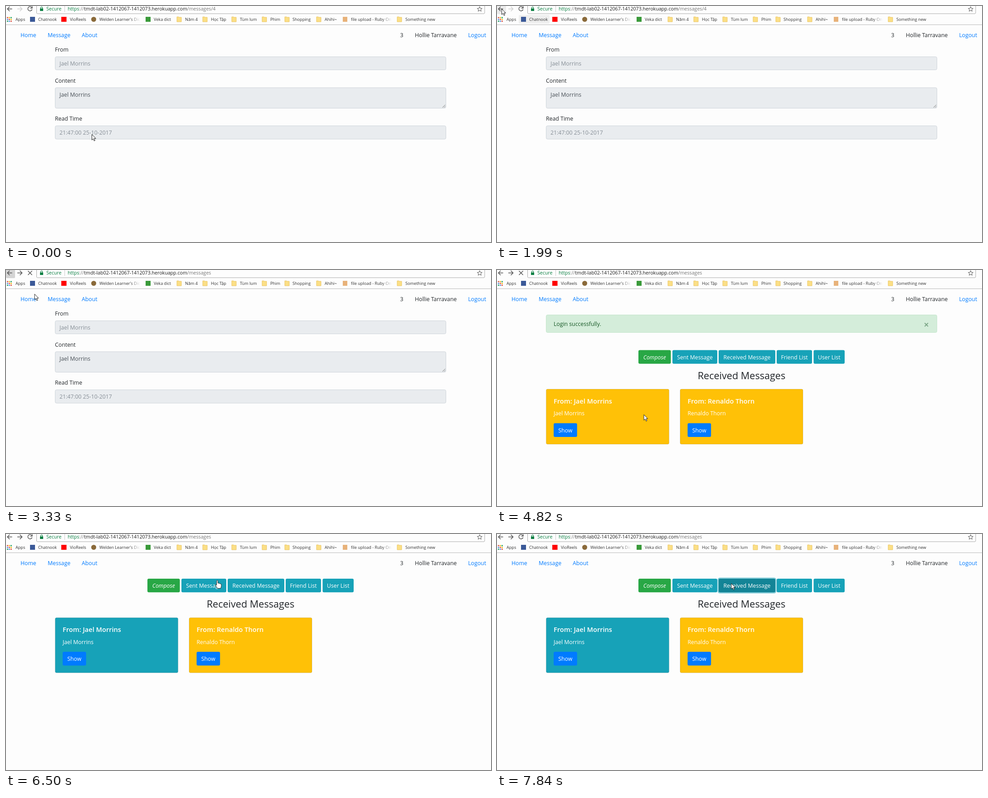
Recreate the animation shown at these times as an HTML page. Size 1070 by 523 pixels, loop 8000 ms.

```html
<!DOCTYPE html>
<html lang="en">
<head>
<meta charset="utf-8">
<title>Messages</title>
<style>
html, body { margin: 0; width: 100%; height: 100%; overflow: hidden; background: #fdfdfd; }
svg { display: block; width: 1070px; height: 523px; font: 12.25px "Open Sans", "Noto Sans", sans-serif; fill: #212529; }
text { white-space: pre; }
.mark { font-size: 9.15px; fill: #333; }
.url { font-size: 10.64px; fill: #777; }
.link { fill: #007bff; }
.white { fill: #fff; }
.mid { text-anchor: middle; }
.h5 { font-size: 14.6px; font-weight: 600; }
.h3 { font-size: 21.6px; }
.field { fill: #e9ecef; stroke: #ced4da; }
.icon { fill: none; stroke: #555; stroke-width: 1.5; }
</style>
</head>
<body>
<svg id="stage" viewBox="0 0 1070 523"></svg>
<script>
const sender = "Jael Morrins", other = "Renaldo Thorn", user = "Hollie Tarravane";
const teal = "#17a2b8", yellow = "#ffc107";

const text = (x, y, s, cls = "") => `<text x="${x}" y="${y}" class="${cls}">${s}</text>`;
const rect = (x, y, w, h, fill, r = 0, more = "") =>
  `<rect x="${x}" y="${y}" width="${w}" height="${h}" rx="${r}" fill="${fill}" ${more}/>`;
const path = (d, more = 'class="icon"') => `<path d="${d}" ${more}/>`;
const group = (id, body) => `<g id="${id}">${body}</g>`;
const field = (y, h) => rect(108.5, y, 862, h, "", 3, 'class="field"');

const folder = x => path(`M${x} 24h4l1 1h5v10h-10z`, 'fill="#fbdf86" stroke="#e6bd55" stroke-width=".8"');
const bookmark = (x, s) => text(x, 33, s, "mark");
const fade = x => rect(x, 22, 30, 16, "url(#fade)");

function toolbar() {
  let dots = "";
  for (let i = 0; i < 9; i++)
    dots += rect(2 + i % 3 * 4, 24.5 + (i / 3 | 0) * 4, 2.6, 2.6, ["#db4437", "#f4b400", "#0f9d58", "#4285f4"][i % 4]);
  const folders = [[377, 395, "Năm 4"], [434, 452, "Học Tập"], [498, 516, "Tùm lum"], [565, 583, "Phim"],
    [615, 632, "Shopping"], [685, 703, "Ahihi~"], [863, 881, "Something new"]];
  return `<linearGradient id="fade"><stop stop-color="#fdfdfd" stop-opacity="0"/><stop offset=".75" stop-color="#fdfdfd"/></linearGradient>`
    + rect(0, -2, 20, 20, "#ebebeb", 2, 'id="back"')
    + rect(48, 20, 68, 19, "#efefef", 2, 'id="markHover"')
    + path("M13.5 6.5H3M8 1.5l-5 5 5 5")
    + path("M25 6.5h10.5M30.5 1.5l5 5-5 5", 'class="icon" id="forward"')
    + path("M57 3.4A4.8 4.8 0 1 0 57.6 7.5M57.8 .8v4h-4", 'class="icon" id="reload"')
    + path("M48.5 2l9 9M57.5 2l-9 9", 'class="icon" id="stop"')
    + path("M67.5 -3V15q0 2 2 2H1054q2 0 2-2V-3", 'fill="none" stroke="#a9a9a9"')
    + rect(75, 5.5, 7, 5.5, "#0b8043", .5)
    + path("M76.5 6V4a2 2 0 0 1 4 0v2", 'fill="none" stroke="#0b8043" stroke-width="1.2"')
    + `<text x="89" y="10" class="url" style="fill:#0b8043">Secure</text>`
    + rect(129, 0, 1, 13, "#ccc")
    + `<text x="136" y="10" class="url"><tspan fill="#0b8043">https</tspan>://<tspan fill="#222">tmdt-lab02-1412067-1412073.herokuapp.com</tspan>/messages<tspan id="tail">/4</tspan></text>`
    + path("M1045 1.5l1.5 3.6 3.9.3-3 2.5 1 3.8-3.4-2.1-3.4 2.1 1-3.8-3-2.5 3.9-.3z", 'fill="none" stroke="#555"')
    + dots + bookmark(21, "Apps")
    + rect(53, 24, 11, 11, "#3b5998") + bookmark(71, "Chatnook")
    + rect(122, 24, 11.5, 11, "#f00") + bookmark(141, "VioReels")
    + `<circle cx="193.5" cy="29.5" r="5.5" fill="#8a6a3a"/>` + bookmark(206, "Welden Learner's Dicti") + fade(274)
    + rect(308, 24, 11, 11, "#3a9a3a") + bookmark(326, "Veka dict")
    + folders.map(([x, tx, s]) => folder(x) + bookmark(tx, s)).join("")
    + rect(743, 24, 10, 11, "#e8b27a") + bookmark(761, "file upload - Ruby On") + fade(829)
    + rect(0, 41, 1070, 1, "#b8b8b8");
}

const nav = text(32, 69, "Home", "link") + text(92, 69, "Message", "link") + text(167, 69, "About", "link")
  + text(869.5, 69, "3") + text(902, 69, user) + text(1019.5, 69, "Logout", "link");

const detail = text(108, 101, "From") + field(112.5, 29)
  + `<g fill="#868e96">${text(118, 132, sender)}${text(118, 285, "21:47:00 25-10-2017")}</g>`;
const detailPage = text(108, 101, "From") + text(108, 169.5, "Content") + text(108, 254, "Read Time")
  + field(112.5, 29) + field(181, 45.5) + field(265.5, 29.5)
  + `<g fill="#868e96">${text(118, 132, sender)}${text(118, 285, "21:47:00 25-10-2017")}</g>`
  + `<g fill="#495057">${text(118, 201, sender)}</g>`
  + path("M963 225l6-6M966.5 225l2.5-2.5", 'stroke="#777" fill="none"');

const alertBox = rect(108.5, 99.5, 862, 39, "#d4edda", 3, 'stroke="#c3e6cb"')
  + `<g fill="#155724">${text(125, 124, "Login successfully.")}</g>`
  + path("M943.5 117.5l7.5 7.5M951 117.5l-7.5 7.5", 'stroke="#7ca687" stroke-width="1.8"');

const button = (x, w, s, fill, more = "") => rect(x, 99, w, 30.3, fill, 3) + more
  + `<text x="${x + w / 2}" y="119.3" class="white mid"${s === "Compose" ? ' font-style="italic"' : ""}>${s}</text>`;
const hover = (id, x, w) => rect(x, 99, w, 30.3, "#138496", 3, `id="${id}"`);

const card = (x, name, fill, id = "") => rect(x + .5, 185.5, 271, 122, fill, 3, `stroke="#000" stroke-opacity=".125" ${id}`)
  + text(x + 17, 217, "From: " + name, "h5 white") + text(x + 17, 243.5, name, "white")
  + rect(x + 17, 261, 51.7, 30.5, "#007bff", 3) + text(x + 42.8, 281.2, "Show", "white mid");

const list = button(312, 71.5, "Compose", "#28a745")
  + button(387, 99, "Sent Message", teal, hover("sent", 387, 99))
  + rect(487.8, 97.8, 127.4, 32.7, "none", 4, 'id="ring" stroke="#8bd0db" stroke-width="2.4"')
  + button(489, 125, "Received Message", teal, hover("received", 489, 125))
  + button(617, 78, "Friend List", teal) + button(698.5, 68.5, "User List", teal)
  + text(539.5, 163, "Received Messages", "h3 mid")
  + card(108, sender, teal, 'id="first"') + card(403.5, other, yellow);

const pointer = 'fill="#fff" stroke="#222" stroke-width="1" stroke-linejoin="round"';
const cursor = path("M.5 .5V13L3.4 10.3 5.4 15 7.4 14.1 5.4 9.6H9.2Z", pointer + ' id="arrow"')
  + path("M-1.4 1.2Q0-1 1.4 1.2V6.5Q3 5.6 4 7 5.6 6.3 6.5 7.8 8.6 7.4 9 9.4V13Q8.5 15 7.6 18H.5Q-.8 15.5-3.8 11.6-4.4 9.4-2.6 10L-1.4 11.2Z", pointer + ' id="hand"');

document.getElementById("stage").innerHTML = toolbar() + nav + group("detail", detailPage)
  + group("alert", alertBox) + group("list", list) + group("cursor", cursor);

const $ = id => document.getElementById(id);
const show = (id, on) => $(id).setAttribute("opacity", +on);

// Pointer moves: start, end, number of jumps, goal x, goal y
const moves = [
  [90, 90, 1, 190, 246], [360, 630, 4, 178, 181], [820, 1080, 4, 146, 124], [1360, 1990, 8, 10, 6],
  [3330, 3690, 5, 273, 240], [3870, 4140, 4, 323.5, 320], [5280, 5470, 3, 373, 262],
  [5740, 6240, 6, 438, 137], [6410, 6500, 2, 466, 102.5], [6590, 7120, 7, 516.5, 109]
];

function position(t) {
  let x = 189, y = 284;
  for (const [start, end, n, gx, gy] of moves) {
    if (t < start) break;
    const k = n === 1 ? 1 : Math.min(n, 1 + Math.floor((t - start) / (end - start) * (n - 1) + .05)) / n;
    x += (gx - x) * k;
    y += (gy - y) * k;
  }
  return [x, y];
}

function draw(t) {
  const within = (a, b) => t >= a && t < b;
  const ramp = a => Math.max(0, Math.min(1, (t - a) / 150));
  const onList = t >= 3420, loaded = t >= 5190;
  const loading = within(3150, 3420) || within(4820, 5380);

  show("detail", !onList);
  show("list", onList);
  show("alert", onList && !loaded);
  $("list").setAttribute("transform", `translate(0 ${loaded ? 0 : 78.5})`);
  $("first").setAttribute("fill", loaded ? teal : yellow);

  show("back", within(1900, 3420));
  $("back").setAttribute("fill", t < 3060 ? "#ebebeb" : "#d4d4d4");
  show("markHover", within(1810, 2450));
  $("forward").style.stroke = t < 3150 ? "#d0d0d0" : "#555";
  show("reload", !loading);
  show("stop", loading);
  show("tail", t < 3150);
  $("tail").style.display = t < 3150 ? "" : "none";

  show("sent", ramp(6500) - ramp(6860));
  $("sent").setAttribute("opacity", ramp(6500) - ramp(6860));
  $("received").setAttribute("opacity", ramp(6860));
  $("ring").setAttribute("opacity", ramp(7640));

  const hand = within(6410, 7760);
  show("hand", hand);
  show("arrow", !hand);
  $("cursor").setAttribute("transform", `translate(${position(t)})`);
}

function tick() {
  draw(performance.now() % 8000);
  requestAnimationFrame(tick);
}
tick();
</script>
</body>
</html>
```
